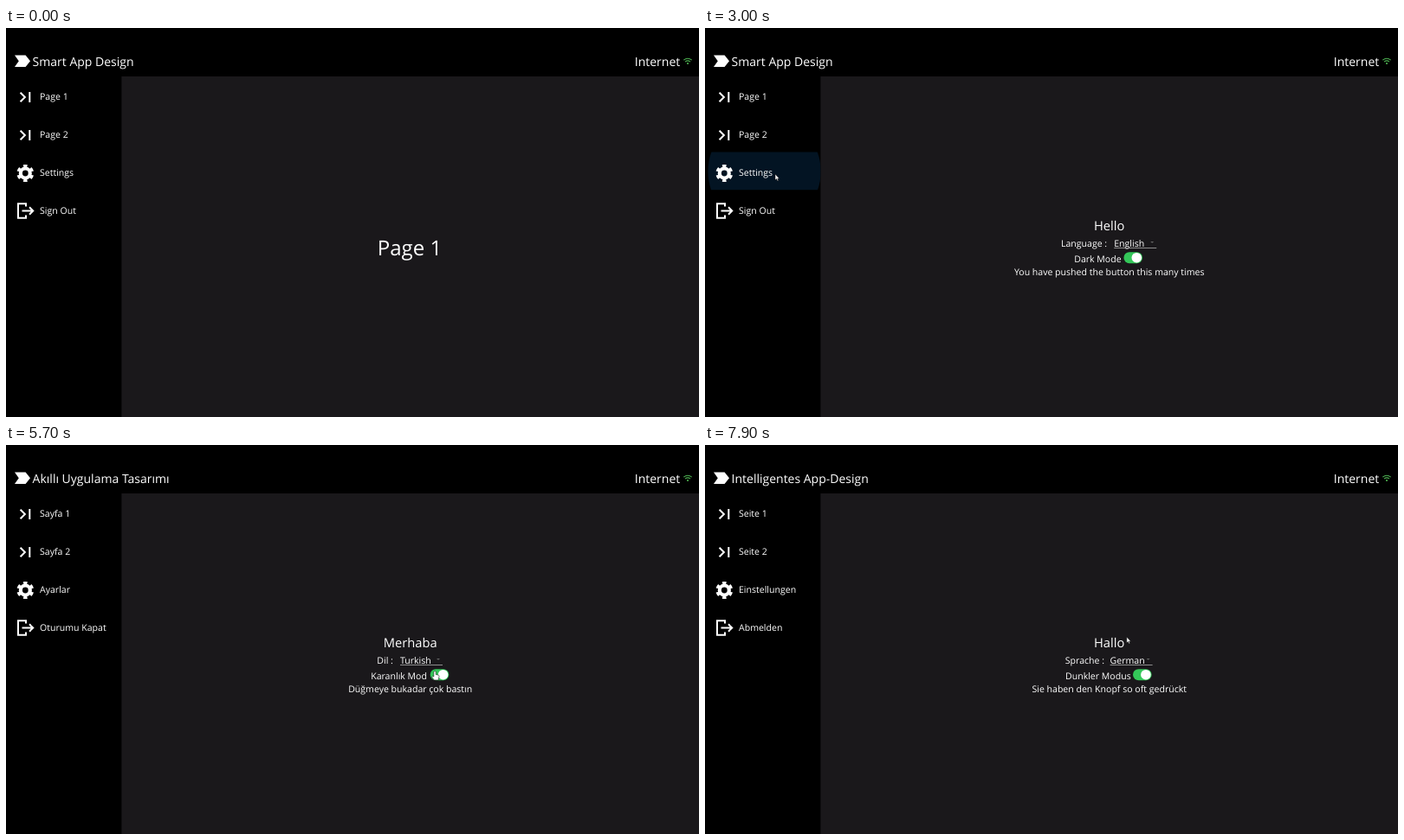
Animation, 800 px wide and 450 px high, one loop 8 s. Source, as an HTML page:

```html
<!DOCTYPE html>
<html lang="en">
<head>
<meta charset="utf-8">
<title>App shell demo</title>
<style>
html, body { margin: 0; width: 100%; height: 100%; overflow: hidden; background: #000; }
svg { display: block; width: 100vw; height: 100vh; }
text { font-family: "Open Sans", "Noto Sans", sans-serif; font-size: 10.55px; fill: #fff; text-rendering: geometricPrecision; white-space: pre; }
.title { font-size: 14px; }
.hello { font-size: 14.7px; }
.page { font-size: 24px; }
.mid { text-anchor: middle; }
.line { fill: none; stroke: #fff; stroke-width: 2; }
</style>
</head>
<body>
<svg viewBox="0 0 800 450">
  <defs>
    <filter id="shadow" x="-20%" y="-20%" width="140%" height="140%">
      <feDropShadow dx="0" dy="1.5" stdDeviation="2" flood-opacity=".5"/>
    </filter>
  </defs>
  <rect width="800" height="450"/>
  <rect x="133.4" y="56" width="667" height="394" fill="#1a181b"/>
  <path d="M10 31.4H22.6L28 38.3 22.6 45.1H10L14.8 38.3Z" fill="#fff"/>
  <text x="725.8" y="44" class="title">Internet</text>
  <g fill="none" stroke="#4caf50" stroke-width="1.1">
    <path d="M782.3 37.2Q787 33.2 791.7 37.2M784 39.1Q787 36.6 790 39.1"/>
    <circle cx="787" cy="41" r=".5" fill="#4caf50"/>
  </g>
  <g id="ripples"></g>
  <g class="line">
    <path id="last" d="M16.6 74.7 21.9 80 16.6 85.3M27.3 74V86"/>
    <use href="#last" y="44"/>
    <circle cx="22.3" cy="168" r="5.5" stroke-width="4.2"/>
    <circle cx="22.3" cy="168" r="8.2" stroke-width="3.6" pathLength="60" stroke-dasharray="5 5" transform="rotate(-105 22.3 168)"/>
    <path d="M23 206.5V203.2H14V219.8H23V216.5M18.5 211.5H30.5M27 207.3 31.2 211.5 27 215.7"/>
  </g>
  <g id="content"></g>
  <g id="cursor"></g>
</svg>
<script>
const LOOP = 8000, CENTER = 466.7;
const CHOICES = ["English", "Turkish", "German"];
const LANGS = [
  { from: 0, title: "Smart App Design", menu: ["Page 1", "Page 2", "Settings", "Sign Out"],
    hello: "Hello", label: "Language :", labelX: 411, dropX: 472.2,
    dark: "Dark Mode", darkX: 426.2, toggleEnd: 505, pushed: "You have pushed the button this many times" },
  { from: 5190, title: "Akıllı Uygulama Tasarımı", menu: ["Sayfa 1", "Sayfa 2", "Ayarlar", "Oturumu Kapat"],
    hello: "Merhaba", label: "Dil :", labelX: 428.3, dropX: 455,
    dark: "Karanlık Mod", darkX: 421.2, toggleEnd: 511.3, pushed: "Düğmeye bukadar çok bastın" },
  { from: 7590, title: "Intelligentes App-Design", menu: ["Seite 1", "Seite 2", "Einstellungen", "Abmelden"],
    hello: "Hallo", label: "Sprache :", labelX: 415.8, dropX: 467.6,
    dark: "Dunkler Modus", darkX: 416, toggleEnd: 515.6, pushed: "Sie haben den Knopf so oft gedrückt" }
];
const TAPS = [
  { at: 1900, x: 85, y: 129, row: 100 },
  { at: 2800, x: 81, y: 169, row: 143.6 }
];
const POPUPS = [
  { open: 4310, press: 5080, close: 5170, selected: 0, pick: 1 },
  { open: 6310, press: 7480, close: 7570, selected: 1, pick: 2 }
];
// start, end, target x, target y
const MOVES = [
  [700, 1400, 85, 129], [2300, 2500, 81, 169], [3100, 4100, 489.3, 247.5],
  [4600, 4900, 495.3, 266], [5600, 6200, 494.3, 248.5],
  [6550, 6800, 494.3, 275], [7600, 7900, 486.8, 222]
];
const ARROW = "M0 0V7L1.6 5.6 2.7 8 3.8 7.5 2.8 5.2H4.8Z";
const HAND = "M-1.2.8Q0-.6 1.2.8V4L4.3 4.8Q5 5 5 6L4.2 10.5H-.8L-3.4 6.8Q-3 5.6-1.2 6.6Z";

const el = id => document.getElementById(id);
const ramp = (t, a, b) => Math.min(1, Math.max(0, (t - a) / (b - a)));
const ease = u => Math.sin(u * Math.PI / 2);
const mix = (a, b, u) => a + (b - a) * u;
const text = (s, x, y, cls = "", alpha = 1) =>
  `<text x="${x}" y="${y}" class="${cls}" opacity="${alpha}">${s}</text>`;
const rect = (x, y, w, h, attrs) => `<rect x="${x}" y="${y}" width="${w}" height="${h}" ${attrs}/>`;

function ripple(t, { at, x, y, row }) {
  if (t < at || t > at + 580) return "";
  const u = ease(ramp(t, at, at + 300));
  const alpha = ramp(t, at, at + 80) * (1 - ramp(t, at + 400, at + 580));
  return `<svg y="${row}" width="133.4" height="43.6"><circle cx="${mix(x, 66.7, u)}"
    cy="${mix(y - row, 21.8, u)}" r="${75 * u}" fill="#031423" opacity="${alpha}"/></svg>`;
}

function settings(lang, choice) {
  const { dropX: x, toggleEnd: end } = lang;
  return text(lang.hello, CENTER, 234, "hello mid")
    + text(lang.label, lang.labelX, 252.5) + text(choice, x, 252.5)
    + rect(x, 254, 49, .8, 'fill="#aaa"')
    + `<path d="M${x + 42} 247h4l-2 1.8Z" fill="#666"/>`
    + text(lang.dark, lang.darkX, 270.5)
    + rect(end - 21.6, 259.2, 21.6, 13, 'rx="6.5" fill="#34c759"')
    + `<circle cx="${end - 6.7}" cy="265.7" r="5.8" fill="#fff"/>`
    + text(lang.pushed, CENTER, 286, "mid");
}

// The menu fades in, grows out of the selected row, then its rows appear in turn.
function popup(t, { open, press, close, selected, pick }) {
  if (t < open || t > close + 90) return "";
  const p = ramp(t, open, open + 230), grow = ramp(p, .25, .5);
  const alpha = ramp(p, 0, .25) * (1 - ramp(t, close, close + 90));
  const x = LANGS[selected].dropX - 6.4, top = 234.3 - 20 * selected;
  const rowY = i => top + 3.3 + 20 * i;
  const y = mix(rowY(selected), top, grow);
  const bottom = mix(rowY(selected) + 20, top + 66.6, grow);
  let out = rect(x, y, 65.5, bottom - y, 'rx="1" fill="#020202" filter="url(#shadow)"');
  if (t >= press) out += rect(x, rowY(pick), 65.5, 20, 'fill="#131214"');
  CHOICES.forEach((name, i) => {
    const start = .5 + (i + 1) / 9;
    const shown = i === selected ? 1 : ramp(p, start, start + 1 / 6);
    out += text(name, x + 6.4, rowY(i) + 14.9, "", shown);
  });
  return `<g opacity="${alpha}">${out}</g>`;
}

function cursor(t) {
  if (t < 700) return "";
  let x = 684, y = 284;
  for (const [a, b, toX, toY] of MOVES) {
    const u = ease(ramp(t, a, b));
    x = mix(x, toX, u);
    y = mix(y, toY, u);
  }
  const hand = t >= 3900 && t < 7700;
  return `<path transform="translate(${x} ${y})" d="${hand ? HAND : ARROW}" fill="#fff" stroke="#000" stroke-width=".5"/>`;
}

function content(t) {
  const index = LANGS.findLastIndex(l => t >= l.from), lang = LANGS[index];
  const menu = lang.menu.map((s, i) => text(s, 39, 82.5 + 44 * i)).join("");
  const body = t < 2900
    ? text(lang.menu[t < 2000 ? 0 : 1], 428.8, 263.3, "page")
    : settings(lang, CHOICES[index]);
  return text(lang.title, 30.6, 44, "title") + menu + body + POPUPS.map(p => popup(t, p)).join("");
}

function draw() {
  const t = performance.now() % LOOP;
  el("ripples").innerHTML = TAPS.map(tap => ripple(t, tap)).join("");
  el("content").innerHTML = content(t);
  el("cursor").innerHTML = cursor(t);
  requestAnimationFrame(draw);
}
draw();
</script>
</body>
</html>
```
